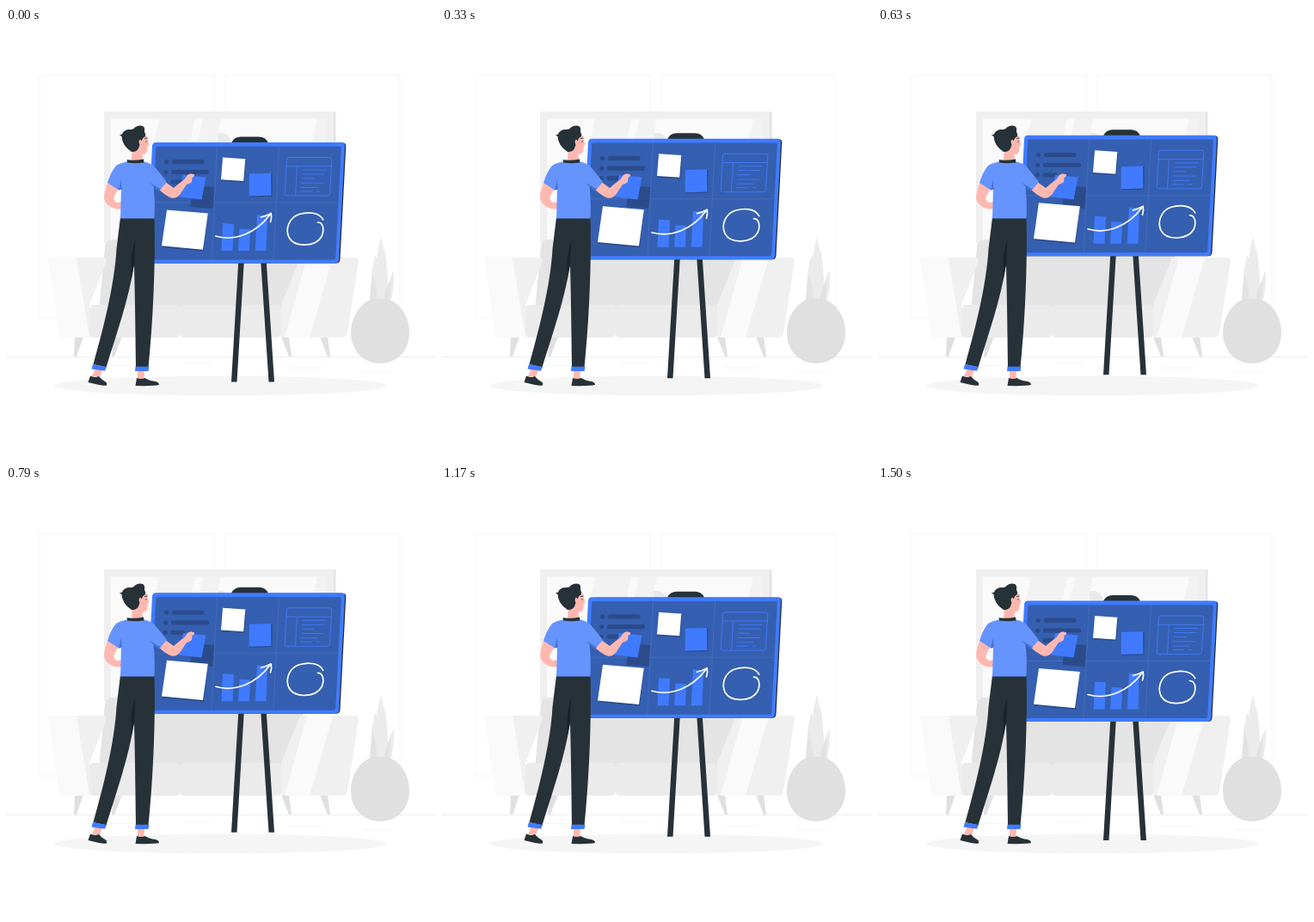
Animation, 500 px wide and 500 px high, one loop 1540 ms. Source, as an HTML page:

```html
<!DOCTYPE html>
<html lang="en">
<head>
<meta charset="utf-8">
<title>Planning board</title>
<style>
  html, body { margin: 0; height: 100%; overflow: hidden; background: #fff; }
  svg { display: block; width: 100vw; height: 100vh; }
  .dark { fill: #263238; }
  .blue { fill: #407bff; }
  .skin { fill: #ffb8b0; }
  .shirt { fill: #6694ff; }
  .shade { fill: #2b4b8b; }
  .line { fill: none; stroke-linecap: round; stroke-linejoin: round; }
</style>
</head>
<body>
<svg viewBox="0 0 500 500">
  <!-- room -->
  <g fill="none" stroke="#f5f5f5">
    <path d="M39 337V55H242.500V337ZM255 337V55H458V337Z"/>
    <path d="M0 382.500H500" stroke="#ededed"/>
    <path d="M99 392.500H152M207 390H241M329 395H368M414 399.500H448"/>
  </g>
  <path fill="#e4e4e4" d="M380 97H383.500V250H380Z"/>
  <path fill="#efefef" d="M114 97H381V250H114Z"/>
  <path fill="#fafafa" d="M122 105.500H373V250H122Z"/>
  <path fill="#f2f2f2" d="M178 105.500H220L190 250H146ZM229 105.500H250L220 250H198ZM362 105.500H373V250H330Z"/>
  <path fill="#e9e9e9" d="M246 122Q258 120 262 132V150H246Z"/>

  <!-- sofa -->
  <g fill="#e0e0e0">
    <path d="M80 359H90L82 382H79ZM125 359H135L126 382H123ZM320 359H329L332 382H329ZM365 359H374L377 382H374Z"/>
  </g>
  <path fill="#e4e4e4" d="M115 254Q116 246 124 246H336Q346 246 346 256L336 350H106Z"/>
  <path fill="#ebebeb" d="M97 327Q97 322 102 322H197Q202 322 202 327V355Q202 360 197 360H102Q97 360 97 355ZM202 327Q202 322 207 322H315Q320 322 320 327V355Q320 360 315 360H207Q202 360 202 355Z"/>
  <path fill="#f0f0f0" d="M54 267H113Q117 267 117 271L97 322V360H68Q63 360 62 355L50 271Q50 267 54 267ZM342 267H406Q410 267 410 271L397 355Q396 360 391 360H320V322Z"/>
  <path fill="#fafafa" d="M53 267H82L97 360H68Q63 360 62 355L50 271ZM350 267H380L353 360H324Z"/>

  <!-- plant -->
  <path fill="#ebebeb" d="M428 322C421 300 426 275 430 263Q434 285 433 322ZM431 322C427 290 431 262 436 243C443 270 442 295 440 322ZM438 322C437 295 438 265 440 256Q446 290 443 322ZM441 322C441 305 446 290 451 282Q452 305 446 322Z"/>
  <path fill="#e2e2e2" d="M423 322Q423 301 427 287Q432 305 431 322ZM439 322Q440 303 447 294Q448 308 444 322Z"/>
  <path fill="#e0e0e0" d="M424 316Q435 313 446 316C460 322 469 337 469 354C469 376 454 390 435 390C416 390 401 376 401 354C401 337 411 321 424 316Z"/>
  <ellipse cx="249.500" cy="416" rx="193.500" ry="11.500" fill="#f5f5f5"/>

  <!-- board -->
  <g class="float">
    <path class="dark" d="M270.500 268H277L268.500 412H262ZM296 268H302.500L312 412H305.500ZM262 138V134Q265 127 273 127H294Q302 127 305 134V138Z"/>
    <path class="dark" d="M177 134H391.500Q395.500 134 395.300 138L388.500 269.500Q388 274 384 274H172Z"/>
    <path class="blue" d="M174 133.500H390Q394.300 133.500 394 138L387.200 269.500Q386.800 274 382.500 274H167Q163 274 163.300 269.500L170 138Q170.300 133.500 174 133.500Z"/>
    <path fill="#355fb0" d="M176 138.200H388Q390 138.200 389.800 140L383.200 268Q383 270 381 270H170Q168 270 168 268L174.200 140Q174.500 138.200 176 138.200Z"/>
    <path class="line" stroke="#4c72bd" stroke-width=".7" d="M245.500 139L239 269.500M317.500 139L311 269.500M171 203.500H386"/>

    <g class="shade">
      <circle cx="186.500" cy="156.200" r="2.600"/>
      <circle cx="185.700" cy="168" r="2.600"/>
      <circle cx="185" cy="179.500" r="2.600"/>
      <path d="M251 153L279 155L277 180L250 178.500ZM283 171L309.500 170L309.500 196.500L283 197Z"/>
    </g>
    <path class="line" stroke="#2b4b8b" stroke-width="5.200" d="M195.500 156.200H228M194.500 168H233.500M194 179.500H206"/>
    <path fill="#fff" d="M252 151L278.300 152.700L276.200 178.500L250 176.800Z"/>
    <path class="blue" d="M283 170L308 169.200L308.400 195.200L282.600 196ZM252 227.500L265 228.200L263.500 259.500H250.500ZM271.500 234L284 234.500L283 259.500H270ZM292 217.500L304 218.500L302.500 259.500H289.700Z"/>

    <g class="line" stroke="#407bff" stroke-width=".9">
      <path d="M329 151H376.500Q379 151 378.800 153.500L376.500 193Q376.300 195.500 374 195.500H326.500Q324 195.500 324.200 193L326.500 153.500Q326.700 151 329 151ZM326 161.300H378.300M338.500 161.300L336.500 195.500"/>
      <path d="M345 165.500H372M344.500 170.500H370M344 175.500H358M343.500 180.800H369M343 186H362M342.500 190.500H356M361 190.500H365"/>
    </g>
    <g class="line" stroke="#fff" stroke-width="1.700">
      <path d="M244 242.500C266 249 291 239 307 217.500M296.500 220.500Q303 219 308.200 216Q309.300 221 307.500 226"/>
      <path d="M368.700 223.500C364 214.500 351 214 341 217C329 221 324.500 234 329 244C336 256.500 360 255 367 243C371 234 368 226.500 362.500 226.500"/>
    </g>
  </g>

  <path class="shade" d="M217 183L242 185L240.500 210L214.500 208Z"/>

  <g class="float">
    <path class="shade" d="M187 214L234.500 217L230 260L182 255.500Z"/>
    <path fill="#fff" d="M187 212L234.800 216L229 258.200L181 253.700Z"/>
  </g>

  <!-- presenter -->
  <path class="blue" d="M206 171L232.500 173.500L227.500 199.500L201 196.500Z"/>
  <path class="skin" d="M177 187L186 179.500L195 186Q202 180 207.500 176L211 171Q215 168.500 219 170.500Q219.500 172.500 216.500 174L216 179Q213 181.500 210 182L202 194Q197 199 192 197.500Q184 194 177 187Z"/>
  <path class="skin" d="M119 178L132 186Q127 192 125 198Q126 202 129 203L134 202.500V210Q127 212 120 207Q114 202 114 196Q115 188 119 178Z"/>
  <path class="skin" d="M104 396L112 398L109 406L100 405ZM153 397H161L160.500 408H153Z"/>
  <path class="dark" d="M133 220H172.500C174 275 171 340 165.500 395H151C150.500 350 150 312 149 275C143 315 128 357 116.500 394.500L101.500 391C113 350 126 300 128.500 257Z"/>
  <path fill="#1a2327" d="M150 247Q144 264 145.500 291L149 275Z"/>
  <path class="blue" d="M101 391L117 394L115 398.800L99.500 396.500ZM150.500 393.700H166.500L165.500 399H150Z"/>
  <path class="dark" d="M98 404.500Q103 407 108 405Q111 409 116 411.500Q118 413 117 415.500Q112 416.500 95.500 412ZM152 407Q157 409 161.500 407Q167 410.500 174 411Q178 412 178 415Q172 416.500 150.500 416Z"/>
  <path class="shirt" d="M141 155.500Q151 158 160 155.500Q170 157 175 164Q181 171 187 179L178 189.500L171.500 184Q173.500 201 172.500 221.500H133L134 187L131 188.500L118 180Q122 167 128 160Q133 156.500 141 155.500Z"/>
  <path fill="#4572d2" d="M167.500 180L180 187.500L178 189.500L172 185ZM134 176L134.500 188L131 188.500Z"/>
  <path class="skin" d="M147 135L155 126Q161 123 164.500 126L165 131L166.700 135.500L164.700 137L164 144Q161 147.500 158.500 146.500L159 154Q152 156.500 146 154Z"/>
  <path class="dark" d="M140.500 153.300Q150 154.500 160 152.500L160.500 156.500Q150 158 141 156.500Z"/>
  <path class="dark" d="M132 124.500L135 123.500Q137 118 144 118Q148 118.500 150 115.500Q155 112 160 114.500Q162 117 161 120.500Q163 123.500 161.500 126.500Q158 128 158 131.500L156 129.500Q153.500 131 155.500 136L153.500 141Q151 144.500 146 144Q135 137 134.500 126Z"/>
  <path class="line" stroke="#263238" stroke-width=".9" d="M161.500 128.500L164 128M163 131.500V132.500"/>
</svg>
<script>
  const PERIOD = 1540, LIFT = 10, PHASE = 40;
  const floating = document.querySelectorAll('.float');

  function draw(now) {
    const turn = ((now + PHASE) % PERIOD) / PERIOD;
    const y = -LIFT * (1 - Math.abs(1 - 2 * turn));
    floating.forEach(part => part.setAttribute('transform', `translate(0 ${y.toFixed(3)})`));
  }

  let start;
  function tick(now) {
    start ??= now;
    draw(now - start);
    requestAnimationFrame(tick);
  }
  draw(0);
  requestAnimationFrame(tick);
</script>
</body>
</html>
```
